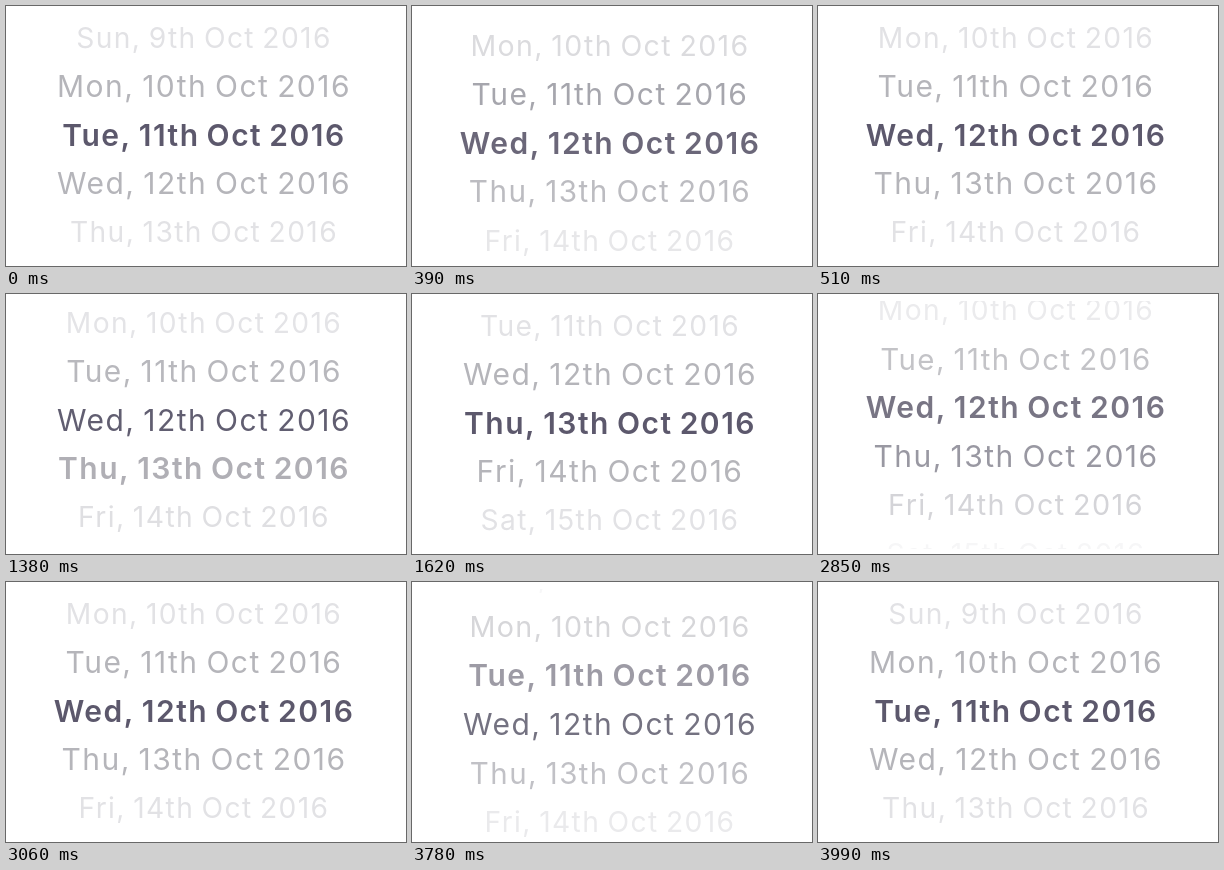
Write an HTML page with a canvas that moves like this. It is 400 px wide and 260 px high and loops after 4500 ms.

```html
<!DOCTYPE html>
<html lang="en">
<head>
<meta charset="utf-8">
<title>Date wheel</title>
<style>
  html, body { margin: 0; width: 100%; height: 100%; overflow: hidden; background: #fff; }
  canvas { display: block; }
</style>
</head>
<body>
<canvas id="stage" width="400" height="260"></canvas>
<script>
const ctx = document.getElementById('stage').getContext('2d');
const LOOP = 4500, STEP = 30;
const CENTER_X = 198, CENTER_Y = 128.7, PITCH = 48.7;
const WEEKDAYS = ['Sun', 'Mon', 'Tue', 'Wed', 'Thu', 'Fri', 'Sat'];
const FIRST_DAY = 11;
const MOVES = [
  { start: 250, duration: 262, by: 1 },
  { start: 1360, duration: 262, by: 1 },
  { start: 2715, duration: 335, by: -1 },
  { start: 3730, duration: 262, by: -1 }
];
// Colours at a distance of 0, 1, 2 and 3 rows from the centre
const SHADES = [[92, 88, 108], [181, 181, 186], [226, 226, 229], [255, 255, 255]];

const lerp = (a, b, k) => a + (b - a) * k;

// Same curve as the CSS "ease" keyword
function ease(x) {
  if (x <= 0 || x >= 1) return x <= 0 ? 0 : 1;
  let low = 0, high = 1, s;
  for (let i = 0; i < 20; i++) {
    s = (low + high) / 2;
    if (0.75 * s * (1 - s) + s ** 3 < x) low = s; else high = s;
  }
  return 0.3 * s * (1 - s) ** 2 + 3 * s * s * (1 - s) + s ** 3;
}

function shade(distance) {
  const i = Math.min(2, Math.floor(distance));
  const k = Math.min(1, distance - i);
  return `rgb(${SHADES[i].map((c, n) => Math.round(lerp(c, SHADES[i + 1][n], k)))})`;
}

function drawRow(day, position, selected) {
  const offset = day - position, distance = Math.abs(offset);
  const scale = distance <= 1 ? 1 : lerp(1, 0.94, Math.min(1, distance - 1));
  ctx.save();
  ctx.translate(CENTER_X, CENTER_Y + offset * PITCH);
  ctx.scale(scale, scale);
  ctx.font = `${selected ? 600 : 400} 30px Inter, sans-serif`;
  ctx.letterSpacing = selected ? '1.5px' : '1.45px';
  ctx.wordSpacing = '-2px';
  ctx.fillStyle = shade(distance);
  ctx.fillText(`${WEEKDAYS[(day + 5) % 7]}, ${day}th Oct 2016`, 0, 11);
  ctx.restore();
}

function draw(time) {
  let position = FIRST_DAY, selected = FIRST_DAY;
  for (const { start, duration, by } of MOVES) {
    if (time < start + STEP / 2) break;
    position += by * ease((time - start) / duration);
    selected += by;
  }
  ctx.clearRect(0, 0, 400, 260);
  ctx.save();
  ctx.beginPath();
  ctx.rect(0, 7, 400, 248);
  ctx.clip();
  ctx.textAlign = 'center';
  for (let day = 9; day <= 15; day++) drawRow(day, position, day === selected);
  ctx.restore();
}

function tick() {
  draw(Math.floor(performance.now() % LOOP / STEP) * STEP);
  requestAnimationFrame(tick);
}
tick();
</script>
</body>
</html>
```
